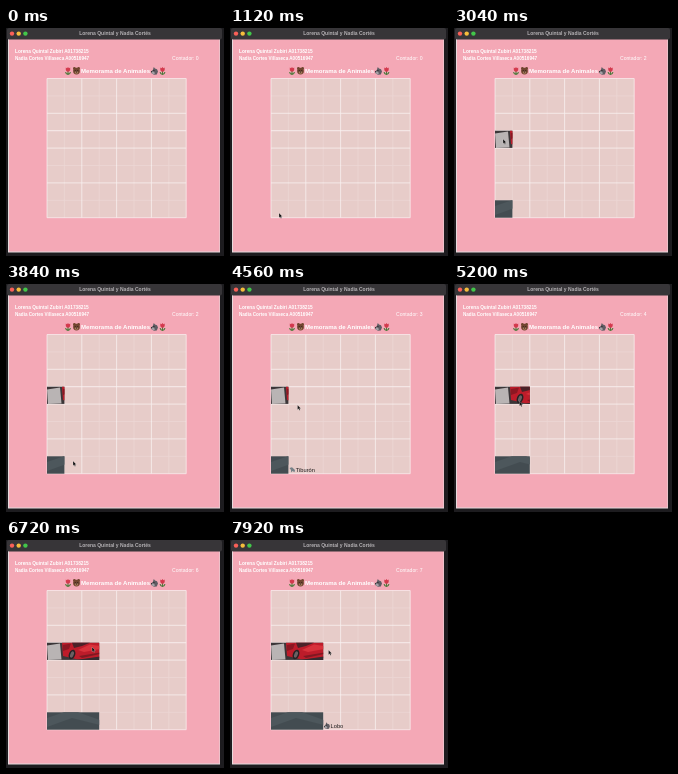
These frames come from a looping animation (218 by 228 pixels, 8 s). An HTML page:

```html
<!DOCTYPE html>
<html lang="es">
<head>
<meta charset="utf-8">
<title>Memorama</title>
<style>
html, body { margin: 0; width: 100%; height: 100%; overflow: hidden; background: #1d1c1f; }
svg { display: block; width: 218px; height: 228px; }
text { font-family: "Liberation Sans", Arial, sans-serif; fill: #fff; }
.bold { font-weight: bold; }
.tag text { fill: #1d1a1b; font-size: 5.7px; }
</style>
</head>
<body>
<svg viewBox="0 0 218 228" xmlns="http://www.w3.org/2000/svg">
  <defs>
    <clipPath id="cut"><rect id="open" x="41" y="102" width="0" height="89"/></clipPath>
    <g id="tulip">
      <path d="M3 4V8M3 7.5Q.8 7 .6 5M3 7.5Q5.2 7 5.4 5" stroke="#4d7a3c" stroke-width="1.1" fill="none"/>
      <path d="M.8.5 2 1.3 3 0 4 1.3 5.2.5V3Q4.8 4.7 3 4.7T.8 3Z" fill="#d3394d"/>
    </g>
    <g id="bear" fill="#71452f">
      <circle cx="1.4" cy="1.5" r="1.4"/><circle cx="5.6" cy="1.5" r="1.4"/>
      <circle cx="3.5" cy="4.1" r="3.4"/>
      <ellipse cx="3.5" cy="5.4" rx="1.6" ry="1.3" fill="#a87c5c"/>
      <path d="M1.8 3.3h.9v.9h-.9zM4.3 3.3h.9v.9h-.9zM3 4.6h1v.8H3z" fill="#211614"/>
    </g>
    <g id="wolf">
      <path d="M2.8 0 4 1.6 6 2.2 7 4.5 5.8 7.6 3 7.8.8 6.6 0 4.6 1.8 3Z" fill="#5f5c63"/>
      <path d="M.2 4.7 2.4 4.4 4 6 3 7.5 1 6.4Z" fill="#a5a1a6"/>
      <path d="M2.4 3h1v.9h-1zM0 4.3h1v.9H0z" fill="#222"/>
    </g>
  </defs>

  <rect width="218" height="228" fill="#1d1c1f"/>
  <rect x="2" y="11" width="212" height="213.5" fill="#e6dadd"/>
  <rect x="3" y="11" width="210.5" height="212.5" fill="#f4a8b6"/>
  <rect x="1" width="215" height="11.5" rx="2" fill="#373538"/>
  <circle cx="6" cy="5.6" r="2.2" fill="#fa6058"/>
  <circle cx="12.7" cy="5.6" r="2.2" fill="#f5bd3c"/>
  <circle cx="19.4" cy="5.6" r="2.2" fill="#42c64a"/>
  <text class="bold" x="109" y="7.4" font-size="5" text-anchor="middle" style="fill:#b5b2b5">Lorena Quintal y Nadia Cortés</text>

  <text class="bold" x="9" y="24.8" font-size="4.75">Lorena Quintal Zubiri A01738215</text>
  <text class="bold" x="9" y="32.2" font-size="4.6">Nadia Cortes Villaseca A00516947</text>
  <text id="count" x="166" y="32.2" font-size="5.1"></text>
  <text class="bold" x="75" y="45.2" font-size="6.05">Memorama de Animales</text>
  <use href="#tulip" x="59" y="39"/>
  <use href="#bear" x="67" y="39"/>
  <use href="#wolf" x="145" y="39"/>
  <use href="#tulip" x="153.5" y="39"/>

  <rect x="41" y="50.5" width="139.2" height="139.2" fill="#e7ccc9"/>
  <path id="thin" stroke="#fff" stroke-width=".7" opacity=".22"/>
  <path id="wide" stroke="#fff" stroke-width=".8" opacity=".7"/>

  <g clip-path="url(#cut)">
    <g>
      <rect x="41" y="102.7" width="53" height="17.2" fill="#3b3638"/>
      <path d="M41 105.5 54 103.5 55.5 119.5 42 119.9Z" fill="#b9b4b4"/>
      <path d="M56 102.7H94V118L72 119.5 57 116Z" fill="#bd1c2a"/>
      <path d="M57 105 65 103.5 63 109 57 111Z" fill="#8c1722"/>
      <path d="M66 102.7H84L76 106 68 108Z" fill="#4b2228"/>
      <path d="M72 110 84 104.5 94 106V109L78 112Z" fill="#d8323b"/>
      <path d="M73 116 94 112.5V114L76 118Z" fill="#801822"/>
      <ellipse cx="66" cy="114.5" rx="3.2" ry="5" transform="rotate(20 66 114.5)" fill="#262224"/>
      <ellipse cx="66" cy="114.5" rx="1.7" ry="3.3" transform="rotate(20 66 114.5)" fill="#6a6063"/>
      <path d="M70 119.9 94 116.5V119.9Z" fill="#352b30"/>
    </g>
    <g>
      <rect x="41" y="172.3" width="53" height="17.4" fill="#434c51"/>
      <path d="M41 178 58 172.3H72L94 180V185L66 178 41 187Z" fill="#4d575c"/>
    </g>
  </g>

  <g class="tag">
    <path d="M42 184 44 183 46 183.5 48 186 46.5 188 44.5 186.5 43 188.5Z" fill="#84969b"/>
    <text x="49" y="188">Delfín</text>
  </g>
  <g class="tag">
    <path d="M59.5 184 62 183.3 65 186 64.5 188.2 62.5 187 61 188.5 61 186Z" fill="#768187"/>
    <text x="65.8" y="188">Tiburón</text>
  </g>
  <g class="tag">
    <use href="#bear" transform="translate(77 182.5) scale(.85)"/>
    <text x="84" y="188">Oso</text>
  </g>
  <g class="tag">
    <use href="#wolf" transform="translate(94 182.3) scale(.85)"/>
    <text x="100.6" y="188">Lobo</text>
  </g>
  <path id="arrow" d="M0 0V4.7L1.1 3.8 1.9 5.5 2.7 5.1 2 3.4H3.4Z" fill="#111" stroke="#f5eeee" stroke-width=".25"/>
</svg>
<script>
const LOOP = 8000, CELL = 17.4;
const LEFT = 41, TOP = 50.5, SIZE = 8 * CELL;
const $ = id => document.getElementById(id);
const tags = document.querySelectorAll(".tag");

const clicks = [1200, 2880, 3920, 5040, 5840, 6560, 7440];
// Each tag shows until its pair is found.
const shown = [[1200, 2880], [3920, 5040], [6000, 6560], [7440, LOOP]];
// Pointer stops: time, x, y
const stops = [
  [560, 48, 147], [960, 49, 185], [2200, 49, 185], [2760, 49, 111],
  [3100, 49, 111], [3700, 67, 177], [4000, 67, 177], [4500, 67.5, 121],
  [4600, 67.5, 121], [4800, 64, 113], [5100, 64, 113], [5720, 85, 174],
  [6050, 85, 174], [6520, 86, 107], [6760, 86, 107], [7260, 100, 177],
  [7460, 100, 177], [7860, 98.5, 110]
];

function gridLines(start) {
  let d = "";
  for (let i = start; i <= 8; i += 2) {
    const p = i * CELL;
    d += `M${LEFT + p} ${TOP}v${SIZE}M${LEFT} ${TOP + p}h${SIZE}`;
  }
  return d;
}
$("thin").setAttribute("d", gridLines(1));
$("wide").setAttribute("d", gridLines(0) + `M${LEFT} ${TOP + 3 * CELL}h${SIZE}`);

function pointer(t) {
  let i = 0;
  while (i < stops.length - 1 && stops[i + 1][0] <= t) i++;
  const a = stops[i], b = stops[i + 1] || a;
  const u = b === a ? 0 : Math.max(0, (t - a[0]) / (b[0] - a[0]));
  const e = u * u * (3 - 2 * u);
  return [a[1] + (b[1] - a[1]) * e, a[2] + (b[2] - a[2]) * e];
}

function draw(t) {
  const n = clicks.filter(c => c <= t).length;
  $("count").textContent = "Contador: " + n;
  $("open").setAttribute("width", Math.floor(n / 2) * CELL);
  tags.forEach((tag, i) => {
    const [on, off] = shown[i];
    tag.setAttribute("visibility", t >= on && t < off ? "visible" : "hidden");
  });
  const [x, y] = pointer(t);
  $("arrow").setAttribute("transform", `translate(${x} ${y})`);
  $("arrow").setAttribute("visibility", t < stops[0][0] ? "hidden" : "visible");
}

function tick() {
  draw(performance.now() % LOOP);
  requestAnimationFrame(tick);
}
tick();
</script>
</body>
</html>
```
